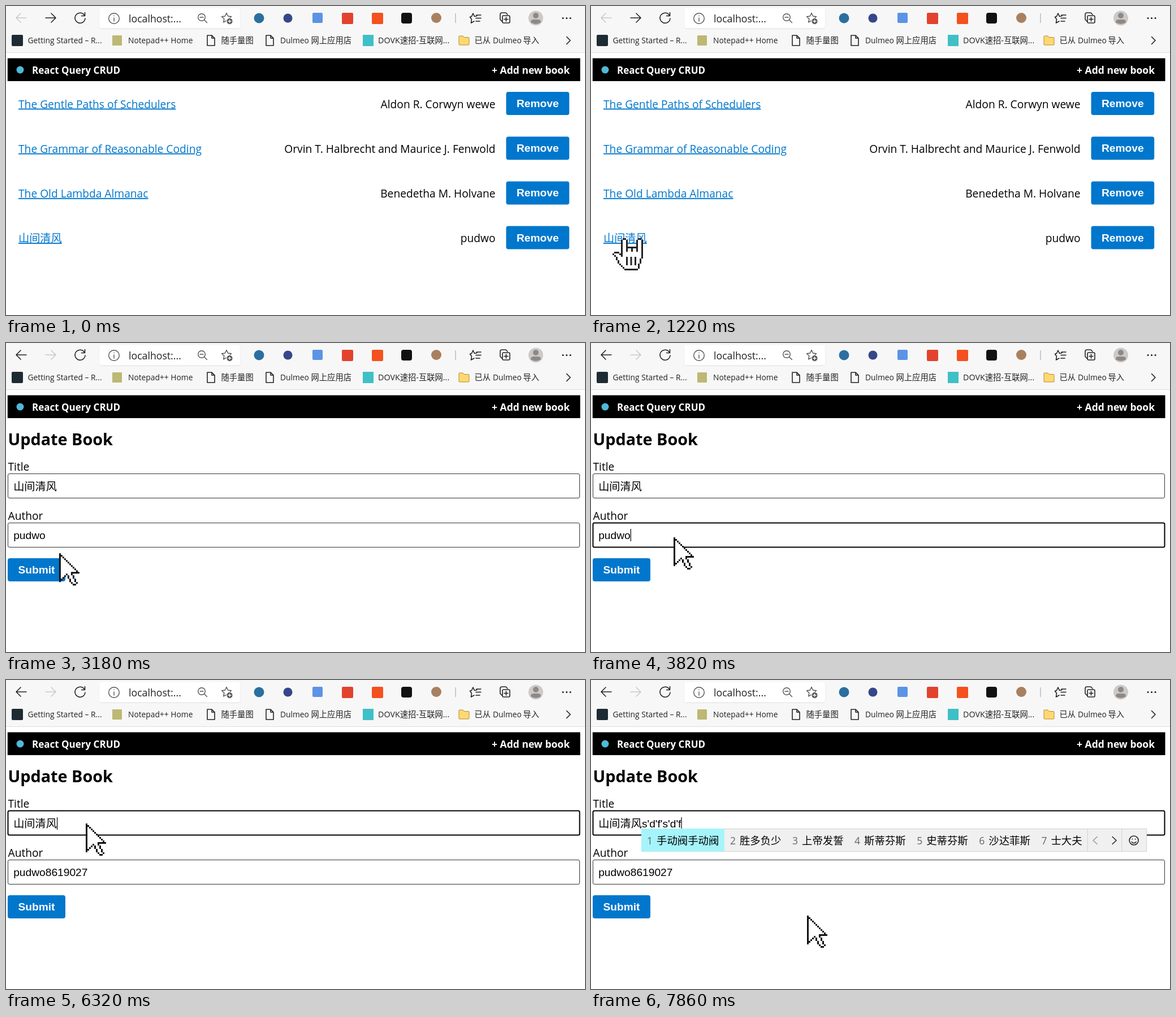
An HTML page for the animation above (8 s loop, 1024 by 547 pixels).

```html
<!DOCTYPE html>
<html lang="zh-CN">
<head>
<meta charset="utf-8">
<title>React Query CRUD</title>
<style>
  html, body { margin: 0; width: 100%; height: 100%; overflow: hidden; background: #fff; }
  svg { display: block; width: 100vw; height: 100vh; }
  text { font: 19.2px "Open Sans", "Noto Sans CJK SC", "Noto Sans CJK JP", sans-serif; white-space: pre; }
  .line { fill: none; stroke: #222; stroke-width: 1.6; stroke-linecap: round; stroke-linejoin: round; }
  .thin { stroke: #555; stroke-width: 1.4; }
  .mark text { font-size: 13.8px; fill: #222; }
  .mark .cjk { font-size: 14.3px; }
  .bar text { font-size: 17px; font-weight: 700; fill: #fff; }
  .bar .end { font-size: 17.5px; }
  .link { fill: #07c; text-decoration: underline; }
  .end { text-anchor: end; }
  .button rect { fill: #07c; }
  .button text { font: 700 19.2px "Liberation Sans", sans-serif; fill: #fff; text-anchor: middle; }
  .field rect { fill: #fff; stroke: #333; stroke-width: 1; }
  .field.focus rect { stroke: #000; stroke-width: 2; }
  .field .value { font-family: "Liberation Sans", "Noto Sans CJK SC", "Noto Sans CJK JP", sans-serif; }
  .ime text { font-size: 18.4px; }
  .ime .num { font-size: 17.5px; fill: #666; }
  .ime .off { stroke: #999; }
  .went .back, .fwd { stroke: #222; }
  .back, .went .fwd { stroke: #c9c9c9; }
</style>
</head>
<body>
<svg viewBox="0 0 1024 547" preserveAspectRatio="none">
  <defs>
    <path id="sheet" class="line" d="M-6-9H2L7-4V9H-6ZM2-9V-4H7"/>
    <path id="star" class="line thin" d="M0-8.5 2.6-3 8.5-2.3 4.2 1.8 5.3 7.8 0 4.9-5.3 7.8-4.2 1.8-8.5-2.3-2.6-3Z"/>
  </defs>

  <g id="browser">
    <rect width="1024" height="83" fill="#f7f7f7"/>
    <rect y="82" width="1024" height="1" fill="#dedede"/>
    <rect x="164.500" y="4" width="250" height="37" rx="5" fill="#e6e6e6"/>
    <rect x="165" y="4" width="249" height="35.500" rx="4" fill="#fff"/>
    <path class="line back" d="M36 21H18M26 13 18 21 26 29"/>
    <path class="line fwd" d="M70 21H88M80 13 88 21 80 29"/>
    <path id="reload" class="line" d="M139 17A9 9 0 1 0 140 22M139.500 11.500V17.500H133.500"/>
    <path id="stop" class="line" d="M125 15 138 28M138 15 125 28"/>
    <g class="line thin">
      <circle cx="191" cy="22" r="9.300"/>
      <path d="M191 21V27M191 17.300V17.500"/>
      <circle cx="346" cy="20" r="6.300"/>
      <path d="M350.700 24.700 355.500 29.500M343 20H349"/>
    </g>
    <text x="217" y="29" style="font-size:17.700px" fill="#222">localhost:...</text>
    <use href="#star" x="390" y="21"/>
    <circle cx="395.500" cy="27" r="5.500" fill="#555" stroke="#fff"/>
    <path d="M392.500 27H398.500M395.500 24V30" stroke="#fff" stroke-width="1.300"/>

    <circle cx="447.500" cy="21.500" r="9" fill="#2b6f9f"/>
    <circle cx="498.500" cy="21.500" r="8" fill="#36468a"/>
    <rect x="542" y="12" width="18" height="18" rx="2" fill="#5b93e6"/>
    <rect id="tool" x="594" y="12" width="20" height="20" rx="2"/>
    <rect x="647" y="12" width="20" height="20" rx="2" fill="#f4511e"/>
    <rect x="699" y="12" width="19" height="19" rx="4" fill="#111"/>
    <circle cx="761" cy="21" r="9" fill="#a9805f"/>
    <path d="M795 13V30" stroke="#bbb" stroke-width="1.500"/>
    <path class="line" d="M833 17.500 828.500 18.500 826 13 823.500 18.500 820.500 19.500 823.500 23.500 822.500 30 828 27M832 16H840M831 21.500H840M831 27H838"/>
    <path class="line" d="M878 28 874 24V15Q874 12 877 12H884L887 15M879 17H889Q891 17 891 19V28Q891 30 889 30H880Q878 30 878 28V18M884.500 20V27M881 23.500H888"/>
    <circle cx="937" cy="21.500" r="13" fill="#cdc9c7"/>
    <circle cx="937" cy="17" r="5" fill="#8d8987"/>
    <path d="M928 29Q928 24 933 24H941Q946 24 946 29 937 35 928 29" fill="#8d8987"/>
    <path d="M985 21.500H985.100M991.500 21.500H991.600M998 21.500H998.100" stroke="#222" stroke-width="3" stroke-linecap="round"/>

    <g class="mark">
      <rect x="10" y="51" width="20" height="20" rx="2" fill="#1e2b33"/>
      <text x="38.500" y="66">Getting Started – R...</text>
      <rect x="188" y="52" width="17" height="18" rx="1" fill="#bdb873"/>
      <text x="216" y="66">Notepad++ Home</text>
      <use href="#sheet" x="362" y="61"/>
      <text class="cjk" x="380.500" y="66">随手量图</text>
      <use href="#sheet" x="466" y="61"/>
      <text x="485" y="66">Dulmeo</text>
      <text class="cjk" x="539.500" y="66">网上应用店</text>
      <rect x="631" y="51" width="19" height="20" fill="#3fc0c6"/>
      <text class="cjk" x="658" y="66">DOVK速招-互联网...</text>
      <path d="M801 54Q801 53 802 53H808L810 55.500H818Q819 55.500 819 57V68Q819 69 818 69H802Q801 69 801 68Z" fill="#ffd970" stroke="#b98b2e"/>
      <text class="cjk" x="828.500" y="66">已从</text>
      <text x="861" y="66">Dulmeo</text>
      <text class="cjk" x="914.500" y="66">导入</text>
      <path class="line" d="M991.500 54.500 998 61 991.500 67.500"/>
    </g>
  </g>

  <g class="bar">
    <rect x="2.800" y="92.500" width="1012.700" height="40.500"/>
    <circle cx="25" cy="113" r="6.500" fill="#4fb9d8"/>
    <text x="46" y="119.500">React Query CRUD</text>
    <text x="997" y="119.500" class="end">+ Add new book</text>
  </g>

  <g id="list"></g>

  <g id="load" fill="#ccc">
    <circle cx="15" cy="151" r="12"/>
    <circle cx="50.500" cy="151" r="7.200"/>
    <circle cx="86.500" cy="151" r="12"/>
  </g>

  <g id="form">
    <text x="3.500" y="181" style="font-size:28.800px;font-weight:700">Update Book</text>
    <text x="3.500" y="226">Title</text>
    <text x="3.500" y="313">Author</text>
    <g class="field" id="title">
      <rect x="3.500" y="231.500" width="1011" height="43" rx="2.500"/>
      <text class="value" x="13.200" y="260.500"></text>
    </g>
    <g class="field" id="author">
      <rect x="3.500" y="318.500" width="1011" height="43" rx="2.500"/>
      <text class="value" x="13.200" y="347"></text>
    </g>
    <rect id="caret" width="1.200" height="22"/>
  </g>

  <g id="popups"></g>
  <circle id="click" r="9.500" fill="#ff0" fill-opacity=".47"/>

  <g id="cursor">
    <g id="arrow" transform="scale(3)">
      <path id="edge" fill="#111"/>
      <path id="body" fill="#fff"/>
    </g>
    <g id="hand" transform="translate(-21 -1) scale(3)">
      <path fill="#222" d="M6 0h2v1h1v4h5V1h1V0h2v1h1v11h-1v3h-1v3h-1v1H7v-1H6v-1H5v-1H4v-1H3v-2H2v-2H1v-1H0V9h1V8h3v1h1V1h1z"/>
      <path fill="#fff" d="M6 1h2v5h7V1h2v11h-1v3h-1v3H7v-1H6v-1H5v-1H4v-2H3v-2H2v-1H1V9h3v1h1v1h1z"/>
      <path fill="#222" d="M8 6h1v2H8zM11 6h1v2h-1zM14 6h1v2h-1zM8 11h1v5H8zM10.500 11h1v5h-1zM13 11h1v5h-1z"/>
    </g>
  </g>
</svg>

<script>
const LOOP = 8000;
const $ = id => document.getElementById(id);
const show = (id, on) => { $(id).style.display = on ? '' : 'none'; };

// Value of the last [time, value] pair already reached.
const at = (steps, t) => {
  let value = steps[0][1];
  for (const [time, v] of steps) if (t >= time) value = v;
  return value;
};

const button = (x, y, w, label) => `<g class="button">
  <rect x="${x}" y="${y}" width="${w}" height="41" rx="4"/>
  <text x="${x + w / 2}" y="${y + 27}">${label}</text></g>`;

const newTitle = '山间清风', newAuthor = 'pudwo';
const books = [
  ['The Gentle Paths of Schedulers', 'Aldon R. Corwyn wewe'],
  ['The Grammar of Reasonable Coding', 'Orvin T. Halbrecht and Maurice J. Fenwold'],
  ['The Old Lambda Almanac', 'Benedetha M. Holvane'],
  [newTitle, newAuthor],
];
$('list').innerHTML = books.map(([title, author], i) => {
  const y = 152 + i * 79.2;
  return `<text class="link" x="22" y="${y + 28.5}">${title}</text>
    <text class="end" x="865.500" y="${y + 28.5}">${author}</text>` + button(884.5, y, 111.7, 'Remove');
}).join('');
$('form').insertAdjacentHTML('beforeend', button(3, 381, 102, 'Submit'));

// Input method window: numbered candidates, paging arrows, emoji button.
const popups = [
  [7100, 1, 312, '是 时 说 上 三 岁 收'],
  [7170, 89, 263, '速度 设定 是的 时点 ♯ 商店 赛道'],
  [7250, 89, 263, '水电费 是打法 四大发 手动阀 胜多负 上帝发 士大夫'],
  [7400, 89, 263, '手动发生 胜多负少 是大发送 上帝发誓 水电费是 四大方式 手动防水'],
  [7550, 89, 263, '手动阀手动 是大法师的 水电费水电 胜多负少 上帝发誓 四大方式 手动防水'],
  [7710, 89, 263, '手动阀手动阀 胜多负少 上帝发誓 斯蒂芬斯 史蒂芬斯 沙达菲斯 士大夫'],
];
const popup = ([, x, y, words], n) => {
  let end = 0, first = 0;
  const items = words.split(' ').map((word, i) => {
    const left = end;
    end += 36.5 + 18.4 * word.length;
    first = first || end;
    return `<text class="num" x="${left + 10}" y="27.500">${i + 1}</text>
      <text x="${left + 27}" y="27.500">${word}</text>`;
  }).join('');
  return `<g class="ime" id="ime${n}" transform="translate(${x} ${y})">
    <rect x=".5" y=".5" width="${end + 104}" height="40" fill="#f0f0f0" stroke="#d2d2d2"/>
    <rect y="0" width="${first}" height="40.500" fill="#a6f4fb"/>${items}
    <g transform="translate(${end})" fill="none">
      <path d="M0 1V40M60.500 1V40" stroke="#d2d2d2"/>
      <path class="line off" d="M17 14.500 10 21 17 27.500"/>
      <path class="line" d="M44 14.500 51 21 44 27.500"/>
      <circle class="line" cx="82" cy="21" r="8"/>
      <path class="line" d="M78 23.500Q82 28 86 23.500M79.300 18.500V19M84.700 18.500V19"/>
    </g></g>`;
};
$('popups').innerHTML = popups.map(popup).join('');

const stairs = n => 'v1h1'.repeat(n);
$('edge').setAttribute('d', `M0 0h1${stairs(11)}v1H8v1h1v2h1v2h1v1H10v1H8v-1H7v-1H6v-2H5v-2H4v1H3v1H2v1H1v1H0z`);
$('body').setAttribute('d', `M1 2h1${stairs(8)}v1H7v2h1v2h1v2h1v1H8v-1H7v-2H6v-2H5v-1H4v1H3v1H2v1H1z`);

const views = [[0, 'list'], [2500, 'load'], [2640, 'form']];
const focus = [[0, ''], [3670, 'author'], [6160, 'title']];
const caret = [[0, ''], [3670, 'author'], [4210, ''], [4670, 'author'], [6160, 'title'], [6690, ''], [7100, 'title']];
const digits = [[0, ''], [5150, '8'], [5310, '861'], [5530, '86190'], [5600, '8619027']];
const pinyin = [[0, ''], [7100, 's'], [7170, "s'd"], [7250, "s'd'f"], [7400, "s'd'f's"], [7550, "s'd'f's'd"], [7710, "s'd'f's'd'f"]];
const clicks = [[0, 0], [2330, 1], [2500, 0], [3670, 1], [3820, 0], [6160, 1], [6320, 0]];
const pointer = [[0, 'arrow'], [1070, 'hand'], [3110, 'arrow']];

// Pointer strokes: start, last step, step count, then from, bend and to.
const moves = [
  [310, 1070, 11, [967, 545], [500, 370], [68, 409]],
  [1140, 1220, 2, [68, 409], [63, 410], [59, 412]],
  [3030, 3510, 7, [59, 412], [158, 295], [146, 344]],
  [5770, 5840, 2, [146, 344], [145, 300], [142, 258]],
  [5990, 6070, 2, [142, 258], [141, 256], [141, 254]],
  [7550, 7860, 5, [141, 254], [250, 350], [382, 417]],
];
function pointerAt(t) {
  const move = moves.filter(m => t >= m[0]).pop();
  if (!move) return null;
  const [start, last, count, from, bend, to] = move;
  const step = Math.min(count - 1, Math.floor((t - start) / (last - start) * (count - 1) + 1e-6));
  const p = (step + 1) / count, u = p * p * (3 - 2 * p), v = 1 - u;
  return from.map((a, i) => v * v * a + 2 * u * v * bend[i] + u * u * to[i]);
}

function draw(t) {
  const view = at(views, t), loading = t >= 2560 && t < 2640;
  for (const id of ['list', 'load', 'form']) show(id, id === view);
  $('browser').classList.toggle('went', t >= 2560);
  show('reload', !loading);
  show('stop', loading);
  $('tool').setAttribute('fill', loading ? '#e2e2e2' : '#e2432d');

  const values = { title: newTitle + at(pinyin, t), author: newAuthor + at(digits, t) };
  for (const id in values) {
    const field = $(id), text = field.querySelector('text');
    field.classList.toggle('focus', at(focus, t) === id);
    if (text.textContent !== values[id]) text.textContent = values[id];
  }
  const blink = at(caret, t);
  show('caret', blink);
  if (blink) {
    const text = $(blink).querySelector('text');
    $('caret').setAttribute('x', 13.2 + text.getComputedTextLength());
    $('caret').setAttribute('y', blink === 'title' ? 243 : 329);
  }

  const open = popups.filter(p => t >= p[0]).length - 1;
  popups.forEach((_, i) => show('ime' + i, i === open));

  const spot = pointerAt(t), kind = at(pointer, t);
  show('cursor', spot);
  show('arrow', kind === 'arrow');
  show('hand', kind === 'hand');
  show('click', at(clicks, t));
  if (spot) for (const id of ['cursor', 'click']) $(id).setAttribute('transform', `translate(${spot})`);
}

function tick() {
  draw(performance.now() % LOOP);
  requestAnimationFrame(tick);
}
tick();
</script>
</body>
</html>
```
